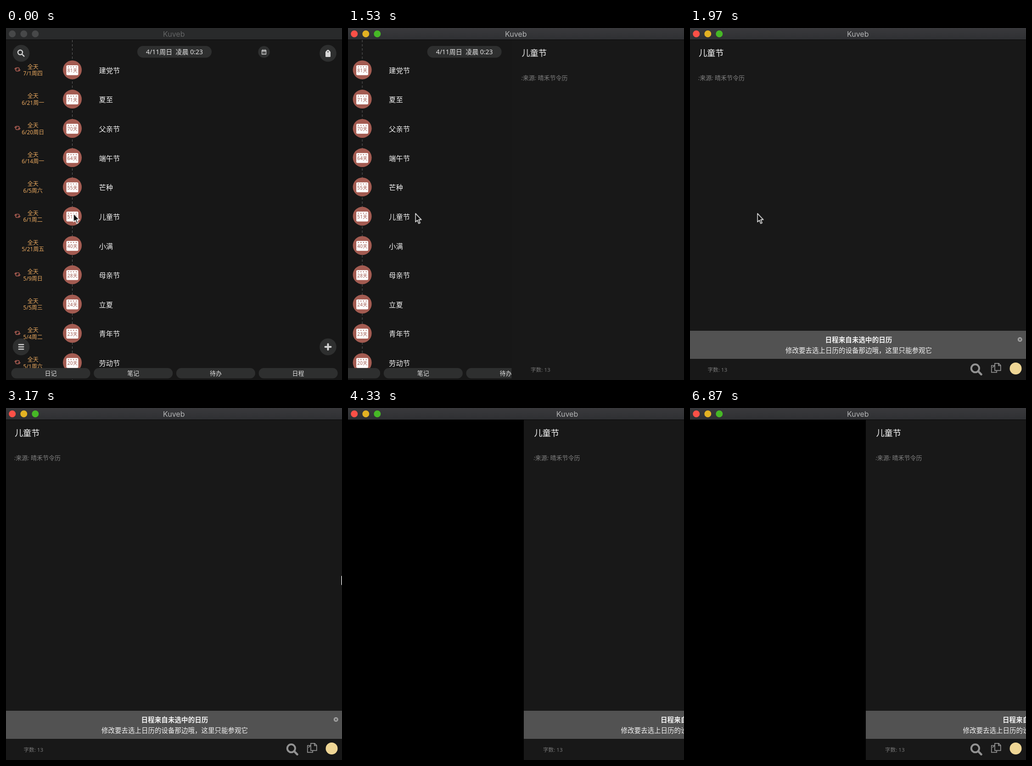
An HTML page for the animation above (6.91 s loop, 732 px wide and 765 px high).

```html
<!DOCTYPE html>
<html lang="zh-CN">
<head>
<meta charset="utf-8">
<title>Schedule</title>
<style>
  html, body { margin: 0; width: 100%; height: 100%; overflow: hidden; background: #000; }
  svg { display: block; width: 732px; height: 765px; }
  text { font-family: "Noto Sans", "Noto Sans CJK SC", "Noto Sans CJK", sans-serif; white-space: pre; }
  .mid { text-anchor: middle; }
  .button { fill: #2e2f2f; }
  .icon { fill: none; stroke: #d0d0d0; stroke-linecap: round; stroke-linejoin: round; }
  .date { font-size: 12px; fill: #eaa95f; }
  .name { font-size: 15.3px; fill: #f2f2f2; }
  .days { font-size: 10px; font-weight: 500; fill: #a1584e; letter-spacing: .3px; }
  .tab { font-size: 13px; fill: #e2e2e2; }
  .title { font: 16px Inter, sans-serif; }

  .anim { animation: 6910ms linear infinite both; }
  #inactive { animation-name: inactive; }
  #list { animation-name: list; }
  #detail { animation-name: detail; }
  #banner { animation-name: banner; }
  #tools { animation-name: push; }
  #stretch { animation-name: stretch; }
  #heading { animation-name: heading; }
  #cursor { animation-name: cursor; }

  @keyframes inactive {
    0% { opacity: 1; animation-timing-function: step-end; }
    2.9%, 100% { opacity: 0; }
  }
  @keyframes list {
    0%, 20.695% { transform: translateX(0); visibility: visible; animation-timing-function: cubic-bezier(.3, .55, .3, 1); }
    26.773% { transform: translateX(-222px); visibility: visible; animation-timing-function: step-end; }
    27%, 100% { transform: translateX(-222px); visibility: hidden; }
  }
  @keyframes push {
    0%, 20.695% { transform: translateX(735px); animation-timing-function: cubic-bezier(.3, .55, .3, 1); }
    26.773%, 100% { transform: translateX(0); }
  }
  @keyframes detail {
    0%, 20.695% { transform: translateX(735px); animation-timing-function: cubic-bezier(.3, .55, .3, 1); }
    26.773% { transform: translateX(0); animation-timing-function: step-end; }
    56.874%, 100% { transform: translateX(386.5px); }
  }
  @keyframes banner {
    0%, 21.708% { transform: translateY(107px); opacity: 0; animation-timing-function: ease-in-out; }
    26.918%, 100% { transform: translateY(0); opacity: 1; }
  }
  @keyframes stretch {
    0%, 55.43% { transform: translateX(0); animation-timing-function: cubic-bezier(.2, .3, .35, 1); }
    65.56%, 67.58% { transform: translateX(236px); animation-timing-function: ease-in-out; }
    74.8%, 100% { transform: translateX(0); }
  }
  @keyframes heading {
    0%, 55.43% { transform: translateX(0); animation-timing-function: cubic-bezier(.2, .3, .35, 1); }
    65.56%, 67.58% { transform: translateX(118px); animation-timing-function: ease-in-out; }
    74.8%, 100% { transform: translateX(0); }
  }
  @keyframes cursor {
    0%, 30.82% { transform: translate(146.5px, 402.5px); animation-timing-function: ease-in-out; }
    39.8% { transform: translate(722px, 336px); animation-timing-function: ease-in-out; }
    45.6%, 55.43% { transform: translate(731px, 365px); animation-timing-function: cubic-bezier(.2, .3, .35, 1); }
    65.56%, 67.58% { transform: translate(967px, 372px); animation-timing-function: ease-in-out; }
    74.8% { transform: translate(731px, 380px); animation-timing-function: ease-in-out; }
    77.4%, 82.5% { transform: translate(567px, 424px); animation-timing-function: ease-in-out; }
    94%, 100% { transform: translate(610px, -30px); }
  }
</style>
</head>
<body>
<svg viewBox="0 0 732 765">
  <defs>
    <linearGradient id="bar" x2="0" y2="1">
      <stop stop-color="#39393c"/><stop offset="1" stop-color="#2f3033"/>
    </linearGradient>
    <clipPath id="rowArea"><path d="M0 26H732V739H0Z"/></clipPath>
    <g id="repeat" fill="none" stroke="#a1584e" stroke-width="1.7" stroke-linecap="round" stroke-linejoin="round">
      <path id="half" d="M-4-2.5V.8Q-4 3.6-1.2 3.6H2.4M-5.8-1L-4-3.2L-2-1"/>
      <use href="#half" transform="rotate(180)"/>
    </g>
    <g id="calendar">
      <circle r="20.5" fill="#a35b51"/>
      <rect x="-13" y="-10" width="26" height="21.5" rx="2.5" fill="#fff"/>
      <path d="M-8.5-6.5h0M-2.9-6.5h0M2.9-6.5h0M8.5-6.5h0" stroke="#a1584e" stroke-width="2.2" stroke-linecap="round"/>
    </g>
    <g id="lights">
      <circle cx="13.7" cy="12.8" r="7.5"/>
      <circle cx="38.8" cy="12.8" r="7.5"/>
      <circle cx="63.8" cy="12.8" r="7.5"/>
    </g>
  </defs>

  <g id="list" class="anim">
    <path d="M0 26H954V765H0Z" fill="#171717"/>
    <path d="M144.5 26V765" stroke="#626262" stroke-dasharray="5 4"/>
    <g id="rows" clip-path="url(#rowArea)"></g>

    <rect class="button" x="286" y="39" width="162" height="25.5" rx="12.75"/>
    <text class="mid" x="367" y="57" font-size="14" fill="#e4e4e4">4/11周日  凌晨 0:23</text>

    <circle class="button" cx="562" cy="52" r="12.7"/>
    <path class="icon" d="M557.5 48.5H566.5V57H557.5ZM557.5 50.5H566.5M559.8 46.8V48M564.2 46.8V48" stroke-width="1.3"/>
    <path class="icon" d="M559.8 53h0M562 53h0M564.2 53h0M559.8 55.2h0M562 55.2h0M564.2 55.2h0" stroke-width="1.2"/>

    <circle class="button" cx="33" cy="55" r="18.3"/>
    <path class="icon" d="M36 53A5 5 0 1 1 26 53A5 5 0 1 1 36 53M35 57.2L39.3 61.4" stroke-width="2.5"/>

    <circle class="button" cx="701.5" cy="55" r="18.3"/>
    <path d="M696 52L700 47.5H703L707 52V61.5Q707 63 705.5 63H697.5Q696 63 696 61.5Z" fill="#d8d8d8"/>
    <circle class="button" cx="701.5" cy="51.7" r="1.3"/>

    <circle class="button" cx="33" cy="693" r="18.3"/>
    <path class="icon" d="M27.8 688H38.2M27.8 693H38.2M27.8 698H38.2" stroke-width="2.5"/>

    <circle class="button" cx="701.5" cy="693" r="18.3"/>
    <path class="icon" d="M695.5 693H707.5M701.5 687V699" stroke-width="4"/>
    <g id="tabs"></g>
  </g>

  <g id="detail" class="anim">
    <path d="M-3.5 26H1200V765H-3.5Z" fill="#181818"/>
    <text x="18.9" y="60.5" font-size="18.2" fill="#fafafa">儿童节</text>
    <text x="18" y="113.2" font-size="13" fill="#808080"><tspan font-style="italic">:</tspan>来源<tspan font-style="italic">:</tspan> 晴禾节令历</text>
    <g id="banner" class="anim">
      <path d="M-3.5 658H1200V719H-3.5Z" fill="#525252"/>
      <text class="mid" x="367.5" y="682.7" font-size="14.6" font-weight="700" fill="#f4f4f4">日程来自未选中的日历</text>
      <text class="mid" x="367.6" y="705.7" font-size="14.5" font-weight="500" fill="#f4f4f4">修改要去选上日历的设备那边哦，这里只能参观它</text>
      <circle cx="718.8" cy="677" r="5" fill="#a3a3a3"/>
      <path d="M716.8 675L720.8 679M720.8 675L716.8 679" stroke="#525252" stroke-width="1.3"/>
    </g>
    <text x="38.5" y="747" font-size="11.6" fill="#fff" fill-opacity=".42">字数: 13</text>
  </g>

  <g id="tools" class="anim">
    <g id="stretch" class="anim" fill="none" stroke="#929292">
      <circle cx="621.4" cy="739.7" r="8.6" stroke-width="4"/>
      <path d="M627.9 746.2L634.5 752.8" stroke-width="4.6" stroke-linecap="round"/>
      <path d="M663.5 733.5H656.8V748.3H668.2V744.6M664 728.8H672.5L676.8 733V744.3H664ZM672 729V733.6H676.6M663.5 733.5L659 738" stroke-width="1.7"/>
      <circle cx="709.5" cy="740" r="13" fill="#efd695" stroke="none"/>
    </g>
  </g>

  <path d="M0 0H732V25H0Z" fill="url(#bar)"/>
  <circle cx="13.7" cy="12.8" r="7.5" fill="#fc5047"/>
  <circle cx="38.8" cy="12.8" r="7.5" fill="#e3b223"/>
  <circle cx="63.8" cy="12.8" r="7.5" fill="#46b826"/>
  <g id="heading" class="anim"><text class="title mid" x="365.7" y="18.7" fill="#b4b5b6">Kuveb</text></g>
  <g id="inactive" class="anim">
    <path d="M0 0H732V25H0Z" fill="#292a2b"/>
    <use href="#lights" fill="#474849"/>
    <text class="title mid" x="365.7" y="18.7" fill="#636465">Kuveb</text>
  </g>
  <path d="M0 25.5H732" stroke="#080808"/>

  <path id="cursor" class="anim" d="M.5.5V19L4.7 15.2L7.6 22.4L10.6 21.1L7.6 14H13Z" fill="#0c0c0c" stroke="#fff" stroke-width="1.5" stroke-linejoin="round"/>
</svg>
<script>
  // date, days left, name, repeats
  const events = [
    ["7/1周四", 81, "建党节", true],
    ["6/21周一", 71, "夏至"],
    ["6/20周日", 70, "父亲节", true],
    ["6/14周一", 64, "端午节"],
    ["6/5周六", 55, "芒种"],
    ["6/1周二", 51, "儿童节", true],
    ["5/21周五", 40, "小满"],
    ["5/9周日", 28, "母亲节", true],
    ["5/5周三", 24, "立夏"],
    ["5/4周二", 23, "青年节", true],
    ["5/1周六", 20, "劳动节", true]
  ];

  document.getElementById("rows").innerHTML = events.map(([date, days, name, repeats], i) => `
    <g transform="translate(0 ${91 + i * 63.62})">
      ${repeats ? '<use href="#repeat" x="25" y="-1"/>' : ""}
      <text class="date mid" x="58.7" y="-2.2">全天</text>
      <text class="date mid" x="58.7" y="12.3">${date}</text>
      <use href="#calendar" x="144.5"/>
      <text class="days mid" x="144.8" y="5.2">${days}天</text>
      <text class="name" x="202.5" y="6.8">${name}</text>
    </g>`).join("");

  document.getElementById("tabs").innerHTML = ["日记", "笔记", "待办", "日程"].map((label, i) => `
    <g transform="translate(${11.5 + i * 179.7} 739)">
      <rect class="button" width="172" height="22.5" rx="11"/>
      <text class="tab mid" x="86" y="16.2">${label}</text>
    </g>`).join("");
</script>
</body>
</html>
```
